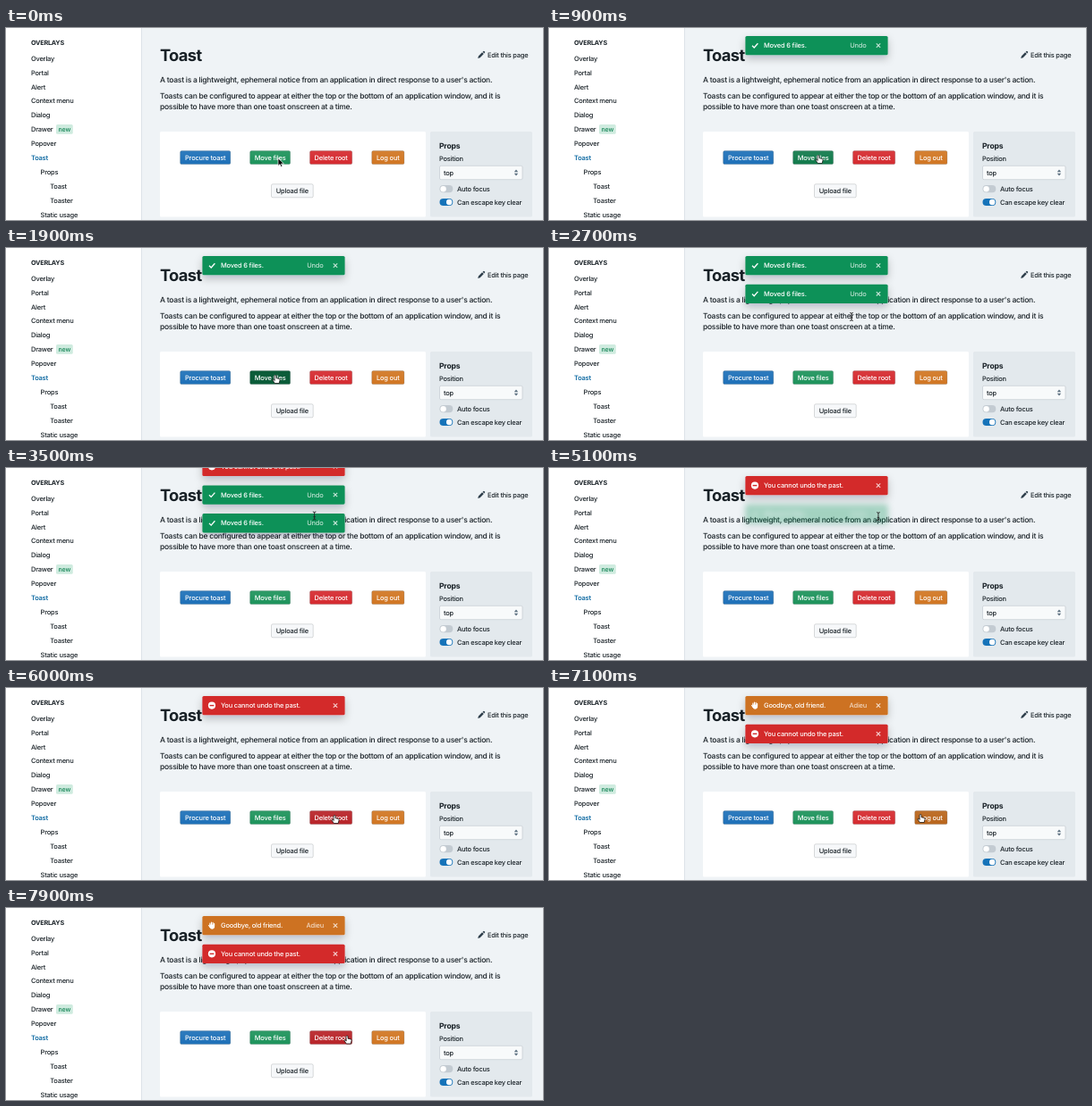
Animation, 600 px wide and 215 px high, one loop 8000 ms. Source, as an HTML page:

```html
<!DOCTYPE html>
<html lang="en">
<head>
<meta charset="utf-8">
<title>Toast</title>
<style>
  html, body { margin: 0; width: 100%; height: 100%; overflow: hidden; background: #eff3f6; }
  svg { display: block; width: 600px; height: 215px; cursor: default; }
  text {
    font: 500 7.45px Inter, "Open Sans", sans-serif; letter-spacing: -.2px;
    fill: #182026; white-space: pre; text-rendering: geometricPrecision;
  }
  .title { font-size: 18.3px; font-weight: 700; letter-spacing: -.65px; }
  .body { font-size: 8.5px; letter-spacing: -.26px; }
  .nav { font-size: 7.2px; font-weight: 700; letter-spacing: -.2px; }
  .head { font-size: 8.6px; font-weight: 700; }
  .current { fill: #106ba3; font-weight: 600; }
  .tag { fill: #0d8050; font-size: 7px; }
  .light { fill: #fff; letter-spacing: -.17px; }
  .action { fill: #fff; fill-opacity: .72; }
  .mid { text-anchor: middle; }
</style>
</head>
<body>
<svg id="stage" viewBox="0 0 600 215">
  <defs>
    <linearGradient id="sheen" x2="0" y2="1">
      <stop offset="0" stop-color="#fff" stop-opacity=".08"/>
      <stop offset="1" stop-color="#fff" stop-opacity="0"/>
    </linearGradient>
    <filter id="shadow" x="-15%" y="-80%" width="130%" height="320%">
      <feDropShadow dx="0" dy="4" stdDeviation="5" flood-color="#10161a" flood-opacity=".24"/>
    </filter>
  </defs>
  <g id="page"></g>
  <g id="toasts"></g>
  <g id="cursor" stroke-linejoin="round" stroke-linecap="round"></g>
</svg>
<script>
const LOOP = 8000, STEP = 100, SLIDE = 300;
const TOAST_TOP = 9, TOAST_PITCH = 31.7, TOAST_HEIGHT = 21.3;

const add = (parent, tag, attrs = {}, content = '') => {
  const node = document.createElementNS('http://www.w3.org/2000/svg', tag);
  for (const key in attrs) node.setAttribute(key, attrs[key]);
  node.textContent = content;
  parent.appendChild(node);
  return node;
};
const byId = id => document.getElementById(id);
const rect = (parent, x, y, width, height, fill, more = {}) =>
  add(parent, 'rect', { x, y, width, height, fill, ...more });
const label = (parent, x, y, content, cls = '') =>
  add(parent, 'text', { x, y, class: cls }, content);
const path = (parent, d, attrs) => add(parent, 'path', { d, fill: 'none', ...attrs });

const page = byId('page');

function drawSidebar() {
  rect(page, 0, 0, 151, 215, '#fff');
  rect(page, 151, 0, 1, 215, '#dde3e8');
  label(page, 28, 19, 'OVERLAYS', 'nav');
  const items = ['Overlay', 'Portal', 'Alert', 'Context menu', 'Dialog', 'Drawer', 'Popover',
    'Toast', '>Props', '>>Toast', '>>Toaster', '>Static usage'];
  items.forEach((item, i) => {
    const depth = item.lastIndexOf('>') + 1;
    label(page, 28 + depth * 10.6, 36.7 + i * 15.9, item.slice(depth), item === 'Toast' ? 'current' : '');
  });
  rect(page, 56, 108, 18.7, 10.8, '#cfebdf', { rx: 1.6 });
  label(page, 65.3, 116, 'new', 'tag mid');
}

function drawArticle() {
  label(page, 172, 37, 'Toast', 'title');
  path(page, 'M527.2 34L527.9 31.4L532 27.3L533.8 29.1L529.7 33.2ZM532.6 26.7L533.4 25.9Q533.9 25.5 534.4 26L535 26.6Q535.4 27.1 535 27.6L534.3 28.4Z', { fill: '#30404d' });
  label(page, 538, 32.8, 'Edit this page');
  label(page, 172, 60.7, "A toast is a lightweight, ephemeral notice from an application in direct response to a user's action.", 'body');
  label(page, 172, 78.7, 'Toasts can be configured to appear at either the top or the bottom of an application window, and it is', 'body');
  label(page, 172, 91.4, 'possible to have more than one toast onscreen at a time.', 'body');
  rect(page, 172, 116, 297, 95.5, '#fff', { rx: 1.5 });
}

function drawSwitch(y, content, on) {
  rect(page, 484.5, y - 4.1, 14.8, 8.2, on ? '#1673b9' : '#c3cbd2', { rx: 4.1 });
  add(page, 'circle', { cx: on ? 495.2 : 488.6, cy: y, r: 3.2, fill: '#fff' });
  label(page, 504, y + 2.7, content);
}

function drawProps() {
  rect(page, 474, 116, 114, 95.5, '#e3e9ed', { rx: 1.5 });
  label(page, 484, 134.6, 'Props', 'head');
  label(page, 484, 149.3, 'Position');
  rect(page, 484.5, 154.3, 92.5, 15.4, '#f8fafb', { rx: 1.6, stroke: '#bcc5cc', 'stroke-width': .6 });
  label(page, 489, 164.6, 'top');
  path(page, 'M567.8 161.2L570 158.4L572.2 161.2ZM567.8 162.8L570 165.6L572.2 162.8Z', { fill: '#5c7080' });
  drawSwitch(180.2, 'Auto focus', false);
  drawSwitch(195, 'Can escape key clear', true);
}

const buttons = [
  { text: 'Procure toast', x: 194.3, y: 137.3, w: 56.8, rest: '#1d70b8', hover: '#10609c', press: '#0e5a8a' },
  { text: 'Move files', x: 272.3, y: 137.3, w: 45.6, rest: '#1d935b', hover: '#117a4b', press: '#0b5c39' },
  { text: 'Delete root', x: 339.2, y: 137.3, w: 47.8, rest: '#d52a2f', hover: '#b82328', press: '#9c1f22' },
  { text: 'Log out', x: 408.4, y: 137.3, w: 36.8, rest: '#d17622', hover: '#b9651b', press: '#a35516' },
  { text: 'Upload file', x: 296.2, y: 174.5, w: 47.3, rest: '#f6f8fa', hover: '#ebf1f5', press: '#d8e1e8', plain: true },
];

function drawButtons() {
  for (const b of buttons) {
    b.face = rect(page, b.x + .3, b.y + .3, b.w - .6, 15, b.rest,
      { rx: 1.5, stroke: '#10161a', 'stroke-opacity': .26, 'stroke-width': .6 });
    b.sheen = rect(page, b.x, b.y, b.w, 15.6, 'url(#sheen)', { rx: 1.6 });
    label(page, b.x + b.w / 2, b.y + 10.4, b.text, b.plain ? 'mid' : 'mid light');
  }
}

const looks = {
  moved: { fill: '#0f9158', text: 'Moved 6 files.', action: 'Undo' },
  past: { fill: '#d32b2c', text: 'You cannot undo the past.' },
  bye: { fill: '#cd7220', text: 'Goodbye, old friend.', action: 'Adieu' },
};

const icons = {
  moved(g) {
    path(g, 'M227 10.8L229.2 13L233.4 8.2', { stroke: '#fff', 'stroke-width': 1.3 });
  },
  past(g) {
    add(g, 'circle', { cx: 230, cy: 10.6, r: 4.1, fill: '#fff' });
    rect(g, 227.6, 9.9, 4.8, 1.4, looks.past.fill);
  },
  bye(g) {
    path(g, 'M227.9 10V8M229.5 9.5V7M231.1 9.5V7.3M232.6 10.5V8.3M226.5 10.5L228.3 12.7',
      { stroke: '#fff', 'stroke-width': 1.1, 'stroke-linecap': 'round' });
    path(g, 'M227.4 9.6H233.1V12.3Q232.7 14.7 230.4 14.7Q228.7 14.7 227.4 12.4Z', { fill: '#fff' });
  },
};

// Oldest first: newer toasts push the older ones down.
const toasts = [
  { kind: 'moved', born: 600, gone: 3500 },
  { kind: 'moved', born: 2000, gone: 4900 },
  { kind: 'past', born: 3500, gone: Infinity },
  { kind: 'bye', born: 6600, gone: Infinity },
];

function drawToasts() {
  for (const toast of toasts) {
    const look = looks[toast.kind];
    const g = toast.node = add(byId('toasts'), 'g');
    rect(g, 219.4, 0, 159.2, TOAST_HEIGHT, look.fill, { rx: 1.6, filter: 'url(#shadow)' });
    icons[toast.kind](g);
    label(g, 240, 13.3, look.text, 'light');
    toast.actionFace = rect(g, 330.8, 2.6, 29.4, 16, '#fff', { rx: 1.6 });
    toast.closeFace = rect(g, 360.4, 2.6, 15.6, 16, '#fff', { rx: 1.6 });
    if (look.action) label(g, 345.3, 13.3, look.action, 'action mid');
    path(g, 'M365.8 8.4L370.2 12.8M370.2 8.4L365.8 12.8',
      { stroke: '#fff', 'stroke-opacity': .75, 'stroke-width': 1.2 });
  }
}

const cursors = {
  arrow: { d: 'M0 0V8.4L2 6.6L3.3 9.5L4.8 8.8L3.5 6H6.1Z', fill: '#000', stroke: '#fff', width: .7 },
  hand: {
    d: 'M-1 1Q-1 0 0 0Q1 0 1 1V3.2L4.2 3.9Q5.3 4.1 5.1 5.3L4.2 9H-.7L-3 5.6Q-3.2 4.4 -2 4.8L-1 5.7Z',
    fill: '#fff', stroke: '#000', width: .7,
  },
  text: {
    d: 'M-1.4 -4.5Q0 -4.5 0 -3.4Q0 -4.5 1.4 -4.5M0 -3.4V3.4M-1.4 4.5Q0 4.5 0 3.4Q0 4.5 1.4 4.5M-.9 1.2H.9',
    fill: 'none', stroke: '#222', width: .9,
  },
};

// Each stop: departure, arrival, x, y.
const route = [
  [0, 0, 304, 146], [0, 200, 301, 142.5], [2100, 2700, 338, 77], [2700, 3200, 344.6, 53.5],
  [4400, 4700, 368, 51], [5000, 5900, 367, 142.5], [6000, 6400, 415, 141.5], [7100, 7900, 381, 143],
];
const presses = [[400, 600], [1800, 2000], [3300, 3500], [4800, 4900], [6500, 6600]];

const clamp = v => Math.max(0, Math.min(1, v));
const smooth = v => v * v * (3 - 2 * v);
// Ease out with a slight overshoot.
const slide = (t, start) => {
  const left = 1 - clamp((t - start) / SLIDE);
  return 1 - left * left * (1.6 * left - .6);
};
const inside = (p, x, y, w, h) => p.x >= x && p.x <= x + w && p.y >= y && p.y <= y + h;

function pointerAt(t) {
  let [, , x, y] = route[0];
  for (const [start, end, toX, toY] of route.slice(1)) {
    const k = smooth(clamp((t - start) / (end - start)));
    x += (toX - x) * k;
    y += (toY - y) * k;
  }
  return { x, y };
}

// A new toast takes its place at once, and the whole stack slides in from one toast height above.
function toastY(t, index) {
  let y = TOAST_TOP - TOAST_PITCH;
  for (const { born } of toasts.slice(index)) {
    if (t >= born) y += TOAST_PITCH - TOAST_HEIGHT * (1 - slide(t, born));
  }
  return y;
}

function placeToasts(t, pointer) {
  let over = null;
  toasts.forEach((toast, i) => {
    const fade = 1 - clamp((t - toast.gone) / SLIDE);
    const shown = t >= toast.born && fade > 0;
    toast.node.style.display = shown ? '' : 'none';
    if (!shown) return;
    const y = toastY(t, i);
    toast.node.setAttribute('transform', `translate(0 ${y})`);
    toast.node.style.opacity = fade;
    toast.node.style.filter = fade < 1 ? `blur(${5 * (1 - fade)}px)` : 'none';
    const alive = t < toast.gone;
    const onAction = alive && !!looks[toast.kind].action && inside(pointer, 330.8, y + 2.6, 29.4, 16);
    const onClose = alive && inside(pointer, 360.4, y + 2.6, 15.6, 16);
    toast.actionFace.setAttribute('fill-opacity', onAction ? .17 : 0);
    toast.closeFace.setAttribute('fill-opacity', onClose ? .17 : 0);
    if (onAction || onClose) over = 'hand';
    else if (!over && alive && inside(pointer, 219, y, 160, TOAST_HEIGHT)) over = 'arrow';
  });
  return over;
}

function paintButtons(t, pointer) {
  const pressed = presses.some(([from, to]) => t >= from && t < to);
  let over = null;
  for (const b of buttons) {
    const hit = t > 0 && inside(pointer, b.x, b.y, b.w, 15.6);
    b.face.setAttribute('fill', !hit ? b.rest : pressed ? b.press : b.hover);
    b.sheen.style.display = hit && pressed ? 'none' : '';
    if (hit) over = 'hand';
  }
  return over;
}

drawSidebar();
drawArticle();
drawProps();
drawButtons();
drawToasts();
const cursorShape = path(byId('cursor'), '', {});

function paintCursor({ d, fill, stroke, width }, { x, y }) {
  const attrs = { d, fill, stroke, 'stroke-width': width, transform: `translate(${x} ${y})` };
  for (const key in attrs) cursorShape.setAttribute(key, attrs[key]);
}

function render(t) {
  const pointer = pointerAt(t);
  const onToast = placeToasts(t, pointer);
  const onButton = paintButtons(t, pointer);
  const onPage = inside(pointer, 172, 52, 386, 43) ? 'text' : 'arrow';
  paintCursor(cursors[onToast || onButton || onPage], pointer);
}

const began = performance.now();
function tick() {
  const t = (performance.now() - began) % LOOP;
  render(Math.floor(t / STEP) * STEP);
  requestAnimationFrame(tick);
}
tick();
</script>
</body>
</html>
```
